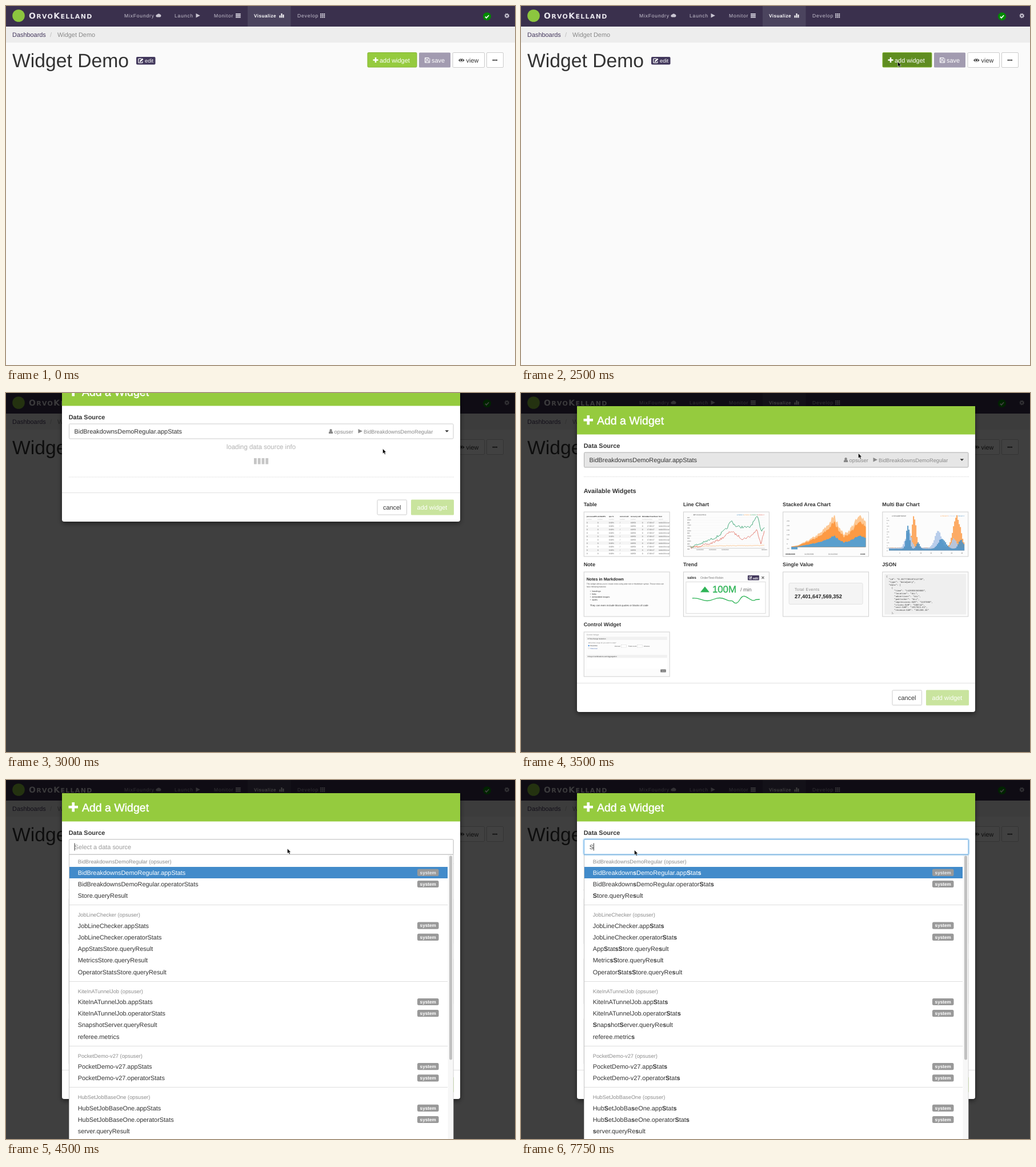
These frames come from a looping animation (891 px wide and 628 px high, 8 s). An HTML page:

```html
<!DOCTYPE html>
<html lang="en">
<head>
<meta charset="utf-8">
<title>Widget Demo</title>
<style>
html, body { margin: 0; width: 100%; height: 100%; overflow: hidden; background: #fafafa; }
svg { display: block; width: 891px; height: 628px; }
text { font-family: "Liberation Sans", Arial, sans-serif; white-space: pre; text-rendering: geometricPrecision; }
.b { font-weight: bold; }
.mid { text-anchor: middle; }
.nav { letter-spacing: .8px; }
.brand { font-family: "DejaVu Sans", sans-serif; font-weight: bold; letter-spacing: 1.3px; }
.code { font-family: "Liberation Mono", monospace; }
</style>
</head>
<body>
<svg id="stage" viewBox="0 0 891 628"></svg>
<script>
const LOOP = 8000, STEP = 250, BASE = 10.92, SMALL = 9.36;
const GREEN = '#95cb3e', TREND = '#2fb457';
const APP = 'BidBreakdownsDemoRegular', USER = 'opsuser';

// ---------- drawing helpers ----------
const rect = (x, y, w, h, fill, more = '') =>
  `<rect x="${x}" y="${y}" width="${w}" height="${h}" fill="${fill}" ${more}/>`;
const text = (x, y, s, size = BASE, fill = '#333', more = '') =>
  `<text x="${x}" y="${y}" font-size="${size}" fill="${fill}" ${more}>${s}</text>`;
const bold = (x, y, s, size, fill) => text(x, y, s, size, fill, 'class="b"');
const path = (d, fill, more = '') => `<path d="${d}" fill="${fill}" ${more}/>`;
const stroke = (d, color, width = 1, more = '') =>
  path(d, 'none', `stroke="${color}" stroke-width="${width}" ${more}`);
const group = (id, inner, more = '') => `<g id="${id}" ${more}>${inner}</g>`;
const at = (x, y, inner) => `<g transform="translate(${x} ${y})">${inner}</g>`;
const range = n => [...Array(n).keys()];
const box = (x, y, w, h, fill, line, r = 1.5) =>
  rect(x + .5, y + .5, w - 1, h - 1, fill, `rx="${r}" stroke="${line}"`);

let seed = 7;
const rnd = () => (seed = (seed * 16807) % 2147483647) / 2147483647 - .5;

function lerp(points, x) {
  let i = 1;
  while (i < points.length - 1 && x > points[i][0]) i++;
  const a = points[i - 1], b = points[i];
  const k = Math.min(1, Math.max(0, (x - a[0]) / (b[0] - a[0])));
  return a.slice(1).map((v, j) => v + (b[j + 1] - v) * k);
}

// ---------- icons ----------
const plus = (x, y, s) => path(`M${x + s * .36} ${y}h${s * .28}v${s * .36}h${s * .36}v${s * .28}h${-s * .36}v${s * .36}h${-s * .28}v${-s * .36}h${-s * .36}v${-s * .28}h${s * .36}z`, '#fff');
const play = (x, y, s, fill) => path(`M${x} ${y}l${s} ${s / 2}l${-s} ${s / 2}z`, fill);
const editIcon = (x, y) => at(x, y,
  stroke('M6 1H1.8Q.8 1 .8 2V7.2Q.8 8.2 1.8 8.2H7Q8 8.2 8 7.2V5.5', '#fff', 1.2) +
  path('M3 4.8L7.6 .2L9.4 2L4.8 6.6H3z', '#fff'));
const userIcon = (x, y) => at(x, y,
  '<circle cx="3.6" cy="2.2" r="2.2" fill="#888"/>' + path('M0 8V6Q0 3.9 2 3.9H5.2Q7.2 3.9 7.2 6V8z', '#888'));

// ---------- page ----------
function navBar() {
  const c = '#c9c5d2';
  const items = [[207, 'MixFoundry'], [295, 'Launch'], [364, 'Monitor'], [510, 'Develop']];
  return rect(0, 0, 891, 36, '#3a304d') + rect(423, 0, 75.5, 36, '#4b445e') +
    '<circle cx="22" cy="17" r="10.8" fill="#8cc63f"/>' +
    text(40, 21.8, 'O<tspan font-size="11">RVO</tspan>K<tspan font-size="11">ELLAND</tspan>', 14, '#e8e6ed', 'class="brand"') +
    items.map(([x, s]) => text(x, 20, s, 8.58, c, 'class="nav"')).join('') +
    text(434, 20, 'Visualize', 8.2, '#fff', 'class="b nav" style="letter-spacing:.45px"') +
    path('M264.5 19.5a2.2 2.2 0 0 1 0 -4.4a2.9 2.9 0 0 1 5 -.5a2.5 2.5 0 0 1 0 4.9z', c) +
    play(332.5, 13, 7.4, c) +
    range(3).map(i => rect(402, 13 + i * 2.8, 8.8, 2.1, c)).join('') +
    rect(478.5, 16.5, 2, 4, '#fff') + rect(481.5, 13, 2, 7.5, '#fff') + rect(484.5, 15, 2, 5.5, '#fff') +
    range(9).map(i => rect(550 + i % 3 * 3, 13 + (i / 3 | 0) * 2.8, 2.3, 2.1, c)).join('') +
    '<circle cx="842" cy="18.3" r="7" fill="#008a00"/>' +
    stroke('M838.8 18.6l2.2 2.3l4.2-4.6', '#fff', 1.7) +
    '<circle cx="876.8" cy="17" r="2.4" fill="none" stroke="#c9c5d2" stroke-width="1.8"/>' +
    '<circle cx="876.8" cy="17" r="3.7" fill="none" stroke="#c9c5d2" stroke-width="1.2" stroke-dasharray="1.5 1.4"/>';
}

function page() {
  return rect(0, 0, 891, 628, '#fafafa') + navBar() +
    rect(0, 36, 891, 28, '#ededed') +
    text(11, 54, 'Dashboards', BASE, '#43365c') + text(77, 54, '/', BASE, '#bbb') + text(90, 54, 'Widget Demo', BASE, '#888') +
    text(11, 107, 'Widget Demo', 33.7) +
    rect(228, 89, 33.5, 13.5, '#42385c', 'rx="2"') + editIcon(231, 91.2) + text(243, 99, 'edit', SMALL, '#fff') +
    `<rect id="addBtn" x="633" y="81.5" width="86" height="25.5" rx="1.5" stroke="#84b532"/>` +
    plus(642.5, 90, 9) + text(654, 98.8, 'add widget', BASE, '#fff') +
    rect(723, 81.5, 55, 26, '#a29bb0', 'rx="1.5"') +
    stroke('M733.4 90.6h6.6l1.8 1.8v6.6h-8.4zM735 90.6v3h4v-3M735 99v-3.2h5v3.2', '#fff', 1) +
    text(745, 98.8, 'save', BASE, '#fff') +
    box(781.5, 81, 56.5, 27, '#fff', '#ccc') + text(805.5, 98.8, 'view') +
    path('M792 95Q797 88.5 802.5 95Q797 101.5 792 95z', '#333') +
    '<circle cx="797.2" cy="95" r="2.7" fill="#fff"/><circle cx="797.2" cy="94.8" r="1.8" fill="#333"/>' +
    box(841, 81, 30, 27, '#fff', '#ccc') +
    range(3).map(i => `<circle cx="${852.8 + i * 3}" cy="94.7" r="1.25" fill="#333"/>`).join('');
}

// ---------- widget previews, drawn from the card's top left corner ----------
const tiny = (x, y, s, fill = '#555', size = 3.3) => text(x, y, s, size, fill);

function tableCard() {
  const cols = [5, 24, 44, 63, 82, 102, 111, 131];
  const heads = ['processedPS', 'emittedPS', 'cpu %', 'current wid', 'recovery wid', 'failures', 'last heartbeat', 'host'];
  const cells = ['0', '0', '0.00%', '/', '10850', '0', '17:08:47', 'node10.local'];
  return cols.map((x, i) => bold(x, 9, heads[i], 2.9, '#222') + tiny(x, 14, i < 7 ? 'number' : 'search', '#bbb', 2.7)).join('') +
    range(10).map(r => rect(4, 15.5 + r * 6.1, 143, 6, r % 2 ? '#fff' : '#f5f5f5') +
      cols.map((x, i) => tiny(x, 20 + r * 6.1, cells[i])).join('')).join('');
}

function lineCard() {
  const curve = (pts, jitter) => 'M' + range(87).map(i => {
    const x = 13 + i * 1.5;
    return `${x} ${(lerp(pts, x)[0] + rnd() * jitter).toFixed(1)}`;
  }).join('L');
  const green = [[13, 62], [36, 54], [61, 43], [76, 30], [84, 16], [93, 26], [116, 28], [126, 14], [130, 9], [137, 34], [143, 24]];
  const red = [[13, 63], [45, 57], [66, 48], [84, 34], [104, 48], [118, 43], [129, 32], [136, 55], [143, 32]];
  return range(13).map(i => tiny(7, 11 + i * 4.6, 9 - i * .5 + '00', '#444', 2.6) + rect(13, 10 + i * 4.6, 130, .3, '#eee')).join('') +
    tiny(18, 6.5, '■ Processed lines', '#333', 2.8) +
    ['#1f77b4', '#ff9a3c', '#2ca05a', '#e0503f'].map((c, i) => tiny(94 + i * 12, 6.5, '● Series ' + (i + 1), c, 2.6)).join('') +
    stroke(curve([[13, 62], [40, 60], [143, 59]], 1.2), '#fbb46c', .7) +
    stroke(curve(red, 4), '#e0695c', .8) + stroke(curve(green, 4.5), '#36a371', .9) +
    rect(13, 64, 130, .4, '#999') +
    range(3).map(i => tiny(23 + i * 22, 67.5, '11/02/2010', '#444', 2.6)).join('') + tiny(137, 67.5, '09/04/15', '#444', 2.6);
}

function areaCard() {
  const top = [[15, 1], [27, 3], [47, 13], [67, 25], [80, 40], [90, 54], [97, 40], [107, 22], [117, 30], [128, 46], [138, 56], [144, 46]];
  const noise = range(88).map(() => 1 + rnd() * .2);
  const layer = (share, fill) => path('M15 62' + noise.map((n, i) =>
    `L${15 + i * 1.5} ${(62 - lerp(top, 15 + i * 1.5)[0] * n * share).toFixed(1)}`).join('') + 'V62z', fill);
  return range(7).map(i => tiny(7, 17 + i * 8, 250 - i * 50, '#777', 3)).join('') +
    layer(1, '#fdc894') + layer(.8, '#fd9a44') + layer(.36, '#5a9fcd') +
    rect(15, 62, 11, 4, '#5a9fcd') + rect(15, 62, 129, .4, '#888') +
    bold(5, 75, '09/29/2009', 3.3, '#333') + tiny(38, 75, '11/20/2009', '#666') + tiny(80, 75, '01/11/2010', '#666') + bold(136, 75, '03/29', 3.3, '#333');
}

function barCard() {
  const hump = (x, m, s, h) => h * Math.exp(-(((x - m) / s) ** 2));
  const series = [
    ['#fd9f4e', x => 5 + hump(x, 55, 5, 54) + hump(x, 130, 9, 54)],
    ['#aec7e8', x => 5 + hump(x, 45, 7, 28) + hump(x, 97, 8, 28) + hump(x, 125, 6, 16)],
    ['#4a90c4', x => 3 + hump(x, 44, 4, 40) + hump(x, 104, 9, 18) + hump(x, 137, 6, 15) + hump(x, 62, 4, 12)]
  ];
  return range(13).map(i => tiny(8, 12 + i * 4.8, 6 - i / 2, '#666', 2.8)).join('') +
    tiny(17, 8, '● Grouped', '#333', 2.8) + tiny(29, 8, '● Stacked', '#333', 2.8) +
    series.map(([c], i) => tiny(102 + i * 14, 8, '● Stream ' + i, c, 2.8)).join('') +
    series.map(([c, f]) => range(66).map(i => {
      const h = f(12 + i * 2) * (1 + rnd() * .15);
      return rect(12 + i * 2, (68 - h).toFixed(1), 1.8, h.toFixed(1), c);
    }).join('')).join('') +
    range(7).map(i => tiny(30 + i * 18, 73, i * 8, '#666', 2.8)).join('');
}

function noteCard() {
  return bold(5, 15, 'Notes in Markdown', 7.1, '#222') +
    tiny(5, 22.5, 'This widget allows you to create notes using plain text or Markdown syntax. These notes can', '#444') +
    tiny(5, 27, 'have following features:', '#444') +
    ['headings', 'links', 'embedded images', 'styles'].map((s, i) => tiny(11, 35 + i * 5, '•  ' + s, '#333', 3.8)).join('') +
    tiny(11, 60, 'They can even include block quotes or blocks of code', '#333', 4.3);
}

function trendCard() {
  return bold(7, 12.5, 'sales', 6.3) + text(30, 12.5, 'OrderTest-Robin', 5.5, '#777') +
    rect(113, 6.5, 20, 8.5, '#42385c', 'rx="1"') + at(115, 8, `<g transform="scale(.6)">${editIcon(0, 0)}</g>`) +
    bold(122, 13, 'edit', 5.2, '#fff') + stroke('M137.5 8.5l4 4m0-4l-4 4', '#777', 1.3) +
    box(4.5, 17.5, 140, 56, '#fff', '#ddd', 0) +
    path('M30 36l8-10l8 10z', TREND) + text(51, 36.5, '100M', 16.8, TREND, 'stroke="#2fb457" stroke-width=".4"') +
    text(100, 34, '/ min', 9, '#666') +
    stroke('M16 46.5C28 45 32 51 42 51S54 46 64 46S77 52 83 51S87 56 93 55S100 42 107 43S120 54 127 49L134 48.5', TREND, 1.3);
}

function valueCard() {
  return box(10.5, 19.5, 130, 38, '#f4f4f4', '#e3e3e3', 2) +
    text(21, 33.5, 'Total Events', 6.9, '#888', 'class="b" style="letter-spacing:.5px;font-weight:normal"') +
    bold(21, 46.7, '27,401,647,569,352', 9.3, '#222');
}

function jsonCard() {
  const lines = ['{', '  "id": "0.3077705107412739",', '  "type": "dataQuery",', '  "data": [', '    {',
    '      "time": "1428858360000",', '      "location": "ALL",', '      "advertiser": "ALL",', '      "publisher": "ALL",',
    '      "impressions:SUM": "2497080",', '      "clicks:SUM": "500742",', '      "cost:SUM": "1557923.61",',
    '      "revenue:SUM": "381288.36"', '    },'];
  return rect(4, 4, 143, 71, '#efefef') +
    lines.map((s, i) => text(7, 9.5 + i * 4.95, s, 3.9, '#333', 'class="code"')).join('');
}

function controlCard() {
  return tiny(5, 6.5, 'Control Widget', '#888') +
    rect(5, 9, 141, 5.5, '#f1f1f1') + tiny(7, 13, '▾ Time Range Selection', '#333', 3) +
    tiny(8, 20.5, 'What time range do you want to view?', '#777', 2.9) +
    '<circle cx="9" cy="24.5" r="1.2" fill="#4a90e2"/><circle cx="9" cy="29" r="1.1" fill="#fff" stroke="#bbb" stroke-width=".4"/>' +
    tiny(11.5, 25.7, 'Real-time', '#333', 3) + tiny(11.5, 30, 'Historical', '#4a6fb0', 3) +
    tiny(54, 26.5, 'Interval', '#555', 3) + rect(66, 23, 9, 4.5, '#fff', 'stroke="#ccc" stroke-width=".4"') +
    tiny(78, 26.5, 'Total count', '#555', 3) + rect(94, 23, 9, 4.5, '#fff', 'stroke="#ccc" stroke-width=".4"') + tiny(105, 26.5, 'minutes', '#555', 3) +
    rect(5, 40.5, 141, 5, '#f1f1f1') + tiny(7, 44.3, '▾ Keys Combinations and Aggregation', '#333', 3) +
    rect(5, 47, 141, 18, '#fff') + rect(134.5, 66, 9.5, 5, '#777', 'rx=".6"') + tiny(136.5, 69.7, 'save', '#fff', 2.8);
}

const CARDS = [['Table', tableCard], ['Line Chart', lineCard], ['Stacked Area Chart', areaCard], ['Multi Bar Chart', barCard],
  ['Note', noteCard], ['Trend', trendCard], ['Single Value', valueCard], ['JSON', jsonCard], ['Control Widget', controlCard]];

// ---------- dialog ----------
const dashes = y => stroke(`M110 ${y}H784`, '#ddd', 1, 'stroke-dasharray="1.5 1"');
const footer = y => stroke(`M98 ${y}H795`, '#e2e2e2', 1) +
  box(649.5, y + 12, 52.5, 27, '#fff', '#ccc') + text(660, y + 29.5, 'cancel') +
  rect(709, y + 12, 75, 27, '#c9e49e', 'rx="1.5"') + text(746, y + 29.5, 'add widget', BASE, '#fff', 'class="mid"');

function modal() {
  const cards = CARDS.map(([name, draw], i) => {
    const x = 109.7 + i % 4 * 174.2, y = 207.5 + (i >> 2) * 105;
    return bold(x, y - 9.5, name, 9.15) + at(x, y, rect(.5, .5, 150, 78, '#fcfcfc', 'stroke="#d0d0d0"') + draw());
  }).join('');
  const panel = `<rect id="panel" x="98" y="23" width="697" height="252" rx="4" fill="#fff" filter="url(#shadow)"/>`;
  return panel + rect(98, 23, 697, 49.5, GREEN) + plus(109.5, 39, 16.5) +
    text(133, 54.7, 'Add a Widget', 19.5, '#fff', 'stroke="#fff" stroke-width=".45"') +
    bold(109.7, 96, 'Data Source') +
    group('select', `<rect id="selectBox" x="110.5" y="104" width="672.5" height="26" rx="1.5"/>` +
      text(119.5, 121, APP + '.appStats') + userIcon(565, 113) + text(574.5, 120.5, USER, SMALL, '#888') +
      play(616.5, 113, 7.5, '#888') + text(626, 120.5, APP, 9.25, '#888') + path('M768.5 115.3h6.6l-3.3 3.5z', '#333')) +
    group('loading', text(446.5, 148, 'loading data source info', 11.4, '#bebebe', 'class="mid" stroke="#bebebe" stroke-width=".2"') +
      range(4).map(i => rect(434 + i * 6.8, 164, 4.8, 10.5, '#c6c6c6')).join('') + dashes(197) + footer(224.5)) +
    group('widgets', dashes(146.5) + bold(109.7, 174.5, 'Available Widgets', 10.8) + cards + footer(507.5));
}

// ---------- source list ----------
const SOURCES = [
  [APP, ['*.appStats', '*.operatorStats', 'Store.queryResult']],
  ['JobLineChecker', ['*.appStats', '*.operatorStats', 'AppStatsStore.queryResult', 'MetricsStore.queryResult', 'OperatorStatsStore.queryResult']],
  ['KiteInATunnelJob', ['*.appStats', '*.operatorStats', 'SnapshotServer.queryResult', 'referee.metrics']],
  ['PocketDemo-v27', ['*.appStats', '*.operatorStats']],
  ['HubSetJobBaseOne', ['*.appStats', '*.operatorStats', 'server.queryResult']]
];
const rowYs = [];

function sourceList() {
  let y = 143, lines = '', plain = '', marked = '', badges = '';
  for (const [app, names] of SOURCES) {
    lines += text(125.7, y + 3.4, `${app} (${USER})`, 9.3, '#8c8c8c');
    y += 18.9;
    for (const name of names) {
      const label = name.replace('*', app), fill = rowYs.length ? '#333' : '#fff';
      plain += text(125.7, y + 3.9, label, BASE, fill);
      marked += text(125.7, y + 3.9, label.replace(/s/gi, '<tspan class="b">$&</tspan>'), BASE, fill);
      if (name[0] === '*') {
        badges += rect(720, y - 6.2, 37.5, 12.2, '#999', 'rx="2.5"') +
          text(738.7, y + 2.6, 'system', 8.2, rowYs.length ? '#fff' : '#e4ebf2', 'class="b mid"');
      }
      rowYs.push(y);
      y += 20.2;
    }
    lines += stroke(`M111 ${Math.round(y - 3.2) - .5}H773`, '#dedede');
    y += 13.4;
  }
  return rect(110.5, 130.5, 672.5, 500, '#fff', 'stroke="#c4c4c4"') +
    rect(773.5, 131, 9, 500, '#f7f7f7') + rect(776, 132.5, 5, 357, '#c1c1c1', 'rx="2.5"') +
    `<rect id="hover" x="111" width="662" height="20" fill="#f4f4f5"/>` +
    rect(111, 152, 662, 20, '#428bca') + lines + group('plain', plain) + group('marked', marked) + badges;
}

const input = () => `<rect id="glow" x="109.5" y="103" width="674.5" height="28" rx="3" fill="none" stroke="#66afe9" stroke-opacity=".35" stroke-width="3"/>` +
  `<rect id="field" x="110.5" y="104" width="672.5" height="26" rx="1.5" fill="#fff"/>` +
  `<text id="typed" x="119.7" y="121" font-size="${BASE}"></text>` +
  `<rect id="caret" y="110.5" width="1" height="13" fill="#333"/>`;

const stage = document.getElementById('stage');
stage.innerHTML = `<defs><filter id="shadow" x="-5%" y="-5%" width="110%" height="115%">
  <feDropShadow dx="0" dy="3" stdDeviation="4" flood-opacity=".5"/></filter></defs>` +
  page() + group('backdrop', rect(0, 0, 891, 628, '#000', 'opacity=".745"')) +
  group('modal', modal()) + group('drop', sourceList() + input()) +
  group('pointer', path('M0 0V8.6L2 6.8L3.4 10L4.9 9.3L3.5 6.3H6.1Z', '#000', 'stroke="#fff" stroke-width=".5"'));

// ---------- motion ----------
const el = id => document.getElementById(id);
const set = (id, attrs) => Object.entries(attrs).forEach(([k, v]) => el(id).setAttribute(k, v));
const show = (id, on) => set(id, { display: on ? 'inline' : 'none' });

// time, x, y
const POINTER = [
  [750, 123, 616], [1250, 250, 430], [1750, 461, 136], [2250, 648, 101], [2500, 659.5, 97.5], [3250, 659.5, 97.5],
  [3750, 521.5, 113.5], [4250, 492.5, 120], [4500, 492.5, 120], [5000, 440, 185], [5750, 300, 312],
  [6000, 262, 331], [6500, 195, 178.5], [6750, 197, 138], [7000, 198.5, 122.5]
];

function render(t) {
  const [x, y] = lerp(POINTER, t);
  const opened = t >= 3000, loaded = t >= 3500, listed = t >= 4500, typed = t >= 7500;

  show('pointer', t >= 750);
  set('pointer', { transform: `translate(${x} ${y})` });
  set('addBtn', { fill: t >= 2250 ? '#5f8d20' : GREEN });

  show('backdrop', opened);
  show('modal', opened);
  set('modal', { transform: `translate(0 ${t < 3250 ? -50 : 0})` });
  set('panel', { height: loaded ? 535 : 252 });
  show('loading', !loaded);
  show('widgets', loaded);
  const over = loaded && y > 104;
  set('selectBox', { fill: over ? '#e6e6e6' : '#fff', stroke: over ? '#adadad' : '#ccc' });

  show('drop', listed);
  const row = rowYs.findIndex(c => Math.abs(y - c) < 10);
  show('hover', row > 0);
  if (row > 0) set('hover', { y: rowYs[row] - 10 });
  show('plain', !typed);
  show('marked', typed);
  const focused = t >= 4750;
  show('glow', focused);
  set('field', { stroke: focused ? '#66afe9' : '#ccc' });
  el('typed').textContent = typed ? 'S' : 'Select a data source';
  set('typed', { fill: typed ? '#444' : '#999' });
  set('caret', { x: typed ? 126.8 : 119.6 });
  show('caret', Math.floor(t / 500) % 2);
}

const start = performance.now();
let last = -1;
function tick() {
  const t = Math.floor((performance.now() - start) % LOOP / STEP) * STEP;
  if (t !== last) render(last = t);
  requestAnimationFrame(tick);
}
tick();
</script>
</body>
</html>
```
